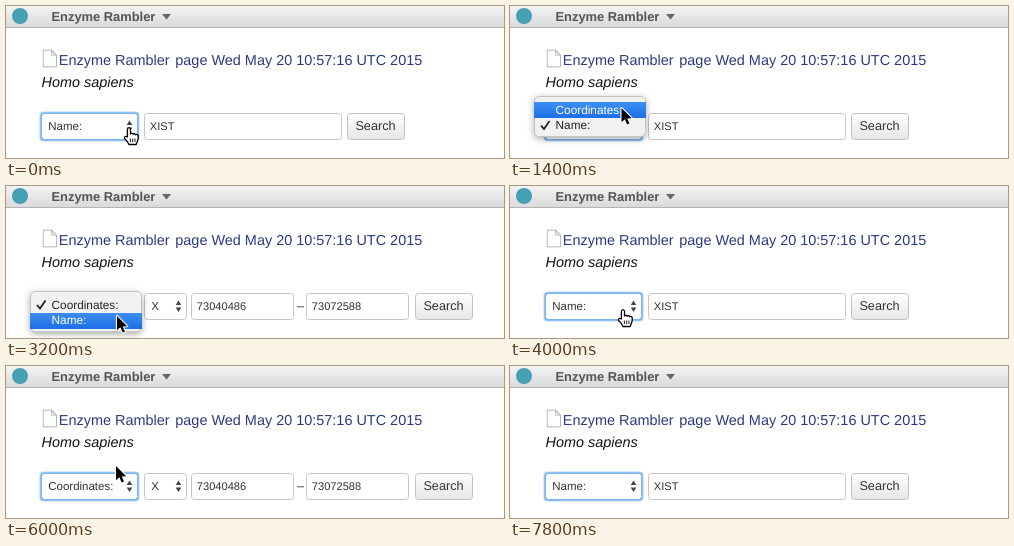
Write an HTML page with a canvas that moves like this. It is 498 px wide and 152 px high and loops after 8 s.

```html
<!DOCTYPE html>
<html lang="en">
<head>
<meta charset="utf-8">
<title>Enzyme Rambler</title>
<style>
html, body { margin: 0; width: 498px; height: 152px; overflow: hidden; background: #fff; }
canvas { display: block; }
</style>
</head>
<body>
<canvas id="stage" width="498" height="152"></canvas>
<script>
const ctx = document.getElementById('stage').getContext('2d');
const LOOP = 8000, STEP = 200;
const SANS = '"Liberation Sans", Arial, sans-serif';
const NAME = 'Enzyme Rambler';
const ITEMS = ['Coordinates:', 'Name:'];

// Pointer hot spot: time, x, y
const PATH = [
  [0, 123, 122], [200, 123, 122], [400, 121, 121], [800, 116, 117],
  [1200, 112, 103], [1600, 111, 101], [2000, 113, 105], [2400, 118, 116],
  [2800, 117, 118], [3200, 111, 130], [3600, 111, 131], [4000, 113, 124],
  [4400, 112, 119], [4800, 111, 118], [5200, 110, 103], [6000, 110, 100],
  [6400, 114, 117], [6600, 114, 118], [7000, 112, 130], [7800, 112, 132]
];
// Menu spans: open, close, selected item while open
const MENUS = [[400, 1600, 1], [2600, 3600, 0], [4400, 5600, 1], [6600, 7800, 0]];

function pointerAt(t) {
  let i = 0;
  while (i < PATH.length - 2 && t >= PATH[i + 1][0]) i++;
  const [t0, x0, y0] = PATH[i], [t1, x1, y1] = PATH[i + 1];
  const p = Math.min(1, (t - t0) / (t1 - t0));
  const e = p * p * (3 - 2 * p);
  return { x: x0 + (x1 - x0) * e, y: y0 + (y1 - y0) * e };
}

function text(str, x, y, size, color, style = '') {
  ctx.font = `${style} ${size}px ${SANS}`;
  ctx.fillStyle = color;
  ctx.fillText(str, x, y);
}

function poly(points, fill, stroke, width = 1) {
  ctx.beginPath();
  points.forEach(([x, y]) => ctx.lineTo(x, y));
  ctx.closePath();
  if (stroke) {
    ctx.strokeStyle = stroke;
    ctx.lineWidth = width;
    ctx.stroke();
  }
  ctx.fillStyle = fill;
  ctx.fill();
}

function shade(y0, y1, top, bottom) {
  const g = ctx.createLinearGradient(0, y0, 0, y1);
  g.addColorStop(0, top);
  g.addColorStop(1, bottom);
  return g;
}

function box(x, y, w, h, r, fill, stroke) {
  ctx.beginPath();
  ctx.roundRect(x + 0.5, y + 0.5, w - 1, h - 1, r);
  ctx.fillStyle = fill;
  ctx.fill();
  if (stroke) {
    ctx.strokeStyle = stroke;
    ctx.lineWidth = 1;
    ctx.stroke();
  }
}

function header() {
  ctx.fillStyle = shade(0, 21, '#f3f3f3', '#dadada');
  ctx.fillRect(0, 0, 498, 21);
  ctx.fillStyle = '#b4b4b4';
  ctx.fillRect(0, 21, 498, 1);
  ctx.beginPath();
  ctx.arc(14, 10, 8, 0, Math.PI * 2);
  ctx.fillStyle = '#469fb4';
  ctx.fill();
  text(NAME, 45.5, 15, 12.9, '#545454', 'bold');
  poly([[156, 8], [165, 8], [160.5, 13.5]], '#666');
}

function title() {
  poly([[37.5, 44.5], [45.5, 44.5], [50, 49], [50, 60.5], [37.5, 60.5]], '#fff', '#9b9b9b', 1.4);
  poly([[45.5, 44.5], [50, 49], [45.5, 49]], '#e4e4e4', '#9b9b9b', 0.9);
  text(NAME, 52.8, 59, 14.45, '#2b3a80');
  text('page Wed May 20 10:57:16 UTC 2015', 169.3, 59, 14.45, '#2b3a80');
  text('Homo sapiens', 35.6, 81, 14.4, '#111', 'italic');
}

function steppers(x) {
  poly([[x - 2.8, 119], [x + 2.8, 119], [x, 114.5]], '#444');
  poly([[x - 2.8, 121.5], [x + 2.8, 121.5], [x, 126]], '#444');
}

function select(x, w, label, focus) {
  if (focus) {
    box(x - 2, 105, w + 4, 31, 4, '#b4d6f8');
    box(x - 1, 106, w + 2, 29, 3.5, '#6eaeee');
  }
  box(x, 107, w, 27, 3, '#fff', focus ? '#7fb4e8' : '#c6c6c6');
  text(label, x + 7.2, 124, 11.5, '#333');
  steppers(x + w - 8.5);
}

function input(x, w, value) {
  box(x, 107, w, 27, 3, '#fff', '#c6c6c6');
  text(value, x + 5.8, 124, 11.1, '#333');
}

function button(x) {
  box(x, 107, 58, 27, 3, shade(107, 134, '#ffffff', '#e6e6e6'), '#c2c2c2');
  text('Search', x + 8.4, 124, 12.7, '#333');
}

function form(item) {
  select(35, 97, ITEMS[item], true);
  if (item === 1) {
    input(138, 198, 'XIST');
    button(341);
  } else {
    select(138, 43, 'X', false);
    input(185, 103, '73040486');
    text('–', 291, 124, 12.5, '#333');
    input(300, 103, '73072588');
    button(409);
  }
}

function check(y, color) {
  ctx.beginPath();
  ctx.moveTo(31, y);
  ctx.lineTo(34, y + 3.5);
  ctx.lineTo(39.5, y - 4.5);
  ctx.strokeStyle = color;
  ctx.lineWidth = 1.8;
  ctx.stroke();
}

function menu(selected, pointerY) {
  const top = selected ? 90 : 105;
  const hover = pointerY < top + 21.5 ? 0 : 1;
  ctx.save();
  ctx.shadowColor = 'rgba(0,0,0,0.38)';
  ctx.shadowBlur = 7;
  ctx.shadowOffsetY = 2;
  box(24, top, 112, 41, 4.5, '#f1f1f1');
  ctx.restore();
  box(24, top, 112, 41, 4.5, '#f1f1f1', '#c4c4c4');
  ITEMS.forEach((label, i) => {
    const y = top + 6 + i * 15.5;
    const color = i === hover ? '#fff' : '#222';
    if (i === hover) {
      ctx.fillStyle = shade(y, y + 16, '#3e90f5', '#1c6fe4');
      ctx.fillRect(24, Math.round(y), 112, 16);
    }
    text(label, 45.6, y + 11.8, 11.8, color);
    if (i === selected) check(y + 8, color);
  });
}

function arrow(x, y) {
  const shape = [[0, 0], [0, 14.2], [3.3, 11.2], [5.7, 16.6], [8, 15.6], [5.7, 10.4], [10.2, 10.2]];
  ctx.save();
  ctx.translate(x, y);
  ctx.lineJoin = 'round';
  poly(shape, '#000', '#fff', 2.2);
  ctx.restore();
}

function hand(x, y) {
  ctx.save();
  ctx.translate(x, y);
  ctx.lineJoin = 'round';
  ctx.beginPath();
  ctx.moveTo(-1.6, 9);
  ctx.lineTo(-1.6, 1);
  ctx.quadraticCurveTo(0, -1.6, 1.5, 1);
  ctx.lineTo(1.5, 6);
  for (const [k, top] of [[1.5, 5.2], [4.2, 5.8], [6.7, 6.8]]) {
    ctx.quadraticCurveTo(k + 1.3, top - 1.2, k + 2.6, top + 1);
  }
  ctx.lineTo(9, 11.5);
  ctx.lineTo(7.2, 16.5);
  ctx.lineTo(0, 16.5);
  ctx.quadraticCurveTo(-1.5, 13, -4.6, 10.2);
  ctx.quadraticCurveTo(-4.6, 7.4, -1.6, 9);
  ctx.closePath();
  ctx.fillStyle = '#fff';
  ctx.fill();
  ctx.strokeStyle = '#000';
  ctx.lineWidth = 1.3;
  ctx.stroke();
  ctx.beginPath();
  for (const k of [1.4, 3.7, 6]) {
    ctx.moveTo(k, 10.5);
    ctx.lineTo(k, 14);
  }
  ctx.lineWidth = 0.9;
  ctx.stroke();
  ctx.restore();
}

function draw(t) {
  const open = MENUS.find(([from, to]) => t >= from && t < to);
  const closed = MENUS.filter(([, to]) => t >= to).length;
  const p = pointerAt(t);
  ctx.textRendering = 'geometricPrecision';
  ctx.fillStyle = '#fff';
  ctx.fillRect(0, 0, 498, 152);
  header();
  title();
  form(closed % 2 ? 0 : 1);
  if (open) menu(open[2], p.y);
  if (t < 7800) (open || p.y < 107 ? arrow : hand)(p.x, p.y);
}

const start = performance.now();
function tick() {
  const t = (performance.now() - start) % LOOP;
  draw(Math.floor(t / STEP) * STEP);
  requestAnimationFrame(tick);
}
tick();
</script>
</body>
</html>
```
